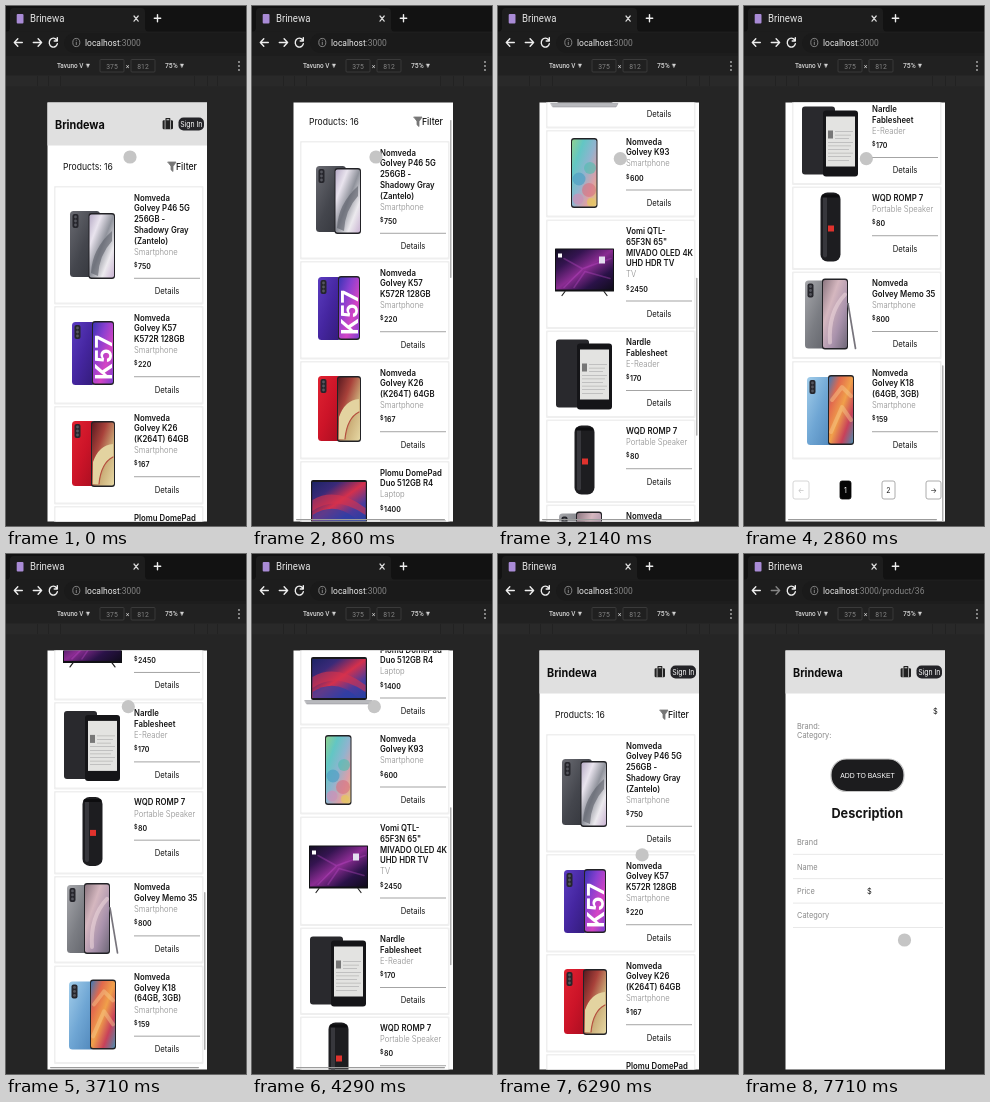
An HTML page for the animation above (8 s loop, 240x520 px).

```html
<!DOCTYPE html>
<html lang="en">
<head>
<meta charset="utf-8">
<title>Brinewa</title>
<style>
  html, body { margin: 0; width: 100%; height: 100%; overflow: hidden; background: #252525; }
  svg { display: block; width: 240px; height: 520px; }
  text { white-space: pre; }
</style>
</head>
<body>
<svg id="stage" viewBox="0 0 240 520" xmlns="http://www.w3.org/2000/svg"></svg>
<script>
const TALL = 1.08;
const UI = "Roboto, 'Open Sans', sans-serif";
const PAGE = "Inter, 'Open Sans', sans-serif";

const rect = (x, y, w, h, fill, r = 0, extra = '') =>
  `<rect x="${x}" y="${y}" width="${w}" height="${h}" rx="${r}" fill="${fill}" ${extra}/>`;
const path = (d, stroke, width = 1, fill = 'none') =>
  `<path d="${d}" stroke="${stroke}" stroke-width="${width}" fill="${fill}" stroke-linecap="round" stroke-linejoin="round"/>`;
const line = (x1, x2, y, color, width = 0.9) =>
  rect(x1, y - width / 2, x2 - x1, width, color);
const dot = (x, y, r, fill) => `<circle cx="${x}" cy="${y}" r="${r}" fill="${fill}"/>`;

// y is the middle of the capitals
function text(x, y, str, size, { fill = '#151515', weight = 400, font = PAGE, anchor = 'start' } = {}) {
  const base = y + 0.36 * size * TALL;
  return `<text transform="translate(${x} ${base}) scale(1 ${TALL})" font-family="${font}" font-size="${size}" font-weight="${weight}" fill="${fill}" text-anchor="${anchor}">${str}</text>`;
}

function gradient(id, ...colors) {
  const stops = colors.map((c, i) => `<stop offset="${i / (colors.length - 1)}" stop-color="${c}"/>`);
  return `<linearGradient id="${id}" x1="0" y1="0" x2="1" y2="1">${stops.join('')}</linearGradient>`;
}

const defs = `<defs>
  ${gradient('graphite', '#6a6b72', '#44464d', '#303238')}
  ${gradient('lilac', '#b7abc6', '#e9e4ee', '#8f929b', '#eceaee', '#c9b3d2')}
  ${gradient('violet', '#5b3cc0', '#4526a0', '#321b78')}
  ${gradient('indigo', '#3b34b4', '#8a3fd0', '#d545c4', '#7a3fd0')}
  ${gradient('red', '#e02231', '#cc1428', '#a80e20')}
  ${gradient('sand', '#5a1a20', '#a8413a', '#cdb27c', '#e6d8a4')}
  ${gradient('laptop', '#1d2466', '#3a2a78', '#d4304c', '#4a3a9c', '#2340a4')}
  ${gradient('aqua', '#8fd08f', '#62c6c4', '#8fb4cf', '#dba0a8', '#e6cc74')}
  ${gradient('night', '#141024', '#341450', '#8a2c92', '#2a1248', '#100c1c')}
  ${gradient('silver', '#a8a9ad', '#7b7d83', '#5c5e65')}
  ${gradient('rose', '#8b7680', '#d5b7bf', '#a992ac', '#6f6878')}
  ${gradient('sky', '#a2cdea', '#6fa6d4', '#4f86ba')}
  ${gradient('coral', '#3f79b5', '#e2694d', '#f0a04a', '#c8415a', '#4b8db0')}
  <clipPath id="view"><rect x="41.5" y="96.5" width="159.5" height="419"/></clipPath>
</defs>`;

const phone = (x, y, w, h, paint) =>
  rect(x, y, w, h, '#222226', 3) + rect(x + 1, y + 1.5, w - 2, h - 3, `url(#${paint})`, 2);
const back = (x, y, w, h, paint) =>
  rect(x, y, w, h, `url(#${paint})`, 3.5) + rect(x + 2.5, y + 3, 6, 14, '#25252b', 2)
  + [6, 10, 14].map(d => dot(x + 5.5, y + d, 1.4, '#55565e')).join('');

// pictures use the card top as y = 0
const pictures = [
  () => back(64, 24, 30, 66, 'graphite') + phone(82.5, 26, 26.5, 66, 'lilac')
    + path('M85 86Q86 62 106 44V54Q93 68 92 89Z', 'none', 0, '#5d606a99'),
  () => back(66, 15, 23, 63, 'violet') + phone(86, 14, 22, 64, 'indigo')
    + `<text transform="translate(105.8 73) rotate(-90)" font-family="${PAGE}" font-size="23.5" font-weight="700" fill="#fff">K57</text>`,
  () => back(66, 14, 23, 65, 'red') + phone(85, 14, 24, 66, 'sand')
    + path('M87 77V55Q93 38 107 37V50Q95 56 93 77Z', 'none', 0, '#e3d3a0')
    + path('M93 77Q95 56 107 50', '#b5503f', 1.2),
  () => rect(59, 18, 56, 43, '#19191d', 2) + rect(60.2, 20, 53.6, 39, 'url(#laptop)')
    + path('M60.5 38Q84 24 113.5 46V53Q84 32 60.5 49Z', 'none', 0, '#d8324e99')
    + path('M60.5 59V53Q84 38 106 59Z', 'none', 0, '#2740a8aa')
    + path('M53 61.5H120L118 65H55Z', '#8b8b90', 0.5, '#b8b9bd'),
  () => phone(73, 7, 26.5, 70, 'aqua')
    + dot(81, 48, 6.5, '#4c9fc5aa') + dot(91, 59, 7, '#d9707f99') + dot(80, 68, 5.5, '#cf8fb8aa')
    + dot(92, 37, 6, '#4fbfae99') + dot(93, 71, 4, '#e8c85caa'),
  () => rect(57, 28, 59, 43, '#101014', 0.5) + rect(58, 29, 57, 40, 'url(#night)')
    + path('M66 67L85 48L113 38M76 67L87 51L112 58M66 38L84 48', '#c64bd055', 1.5)
    + rect(60, 33, 4, 4, '#fff') + rect(101, 36, 6, 7, '#e4def0')
    + path('M67 71L64 75M106 71L109 75', '#222', 1.2),
  () => rect(58, 8, 33, 68, '#29292d', 3) + rect(79, 12, 35, 66, '#151518', 3)
    + rect(82, 18, 29, 50, '#e3e3e1') + rect(84, 32, 5, 8, '#777')
    + Array.from({ length: 9 }, (_, i) => line(i < 3 ? 91 : 84, 109 - i % 3 * 2, 33 + i * 3.6, '#aaa', 0.6)).join(''),
  () => rect(76.5, 5, 20, 69, '#1d1d20', 7) + rect(79, 8, 4, 62, '#37373c', 2)
    + rect(77.5, 7, 18, 3, '#0d0d0f', 1.5) + rect(84, 38, 6, 6, '#e0322d'),
  () => back(61, 8, 26, 68, 'silver') + phone(78, 6, 26, 71, 'rose')
    + path('M86 70Q84 40 101 22', '#f1d9dd88', 4) + path('M104 31L111.5 76', '#77747c', 1.7),
  () => back(63, 15, 25, 68, 'sky') + phone(84, 13, 26, 70, 'coral')
    + path('M87 70L98 45L107 58M88 38L98 25L107 34', '#f6c98c77', 4)
];

const products = [
  [181, 116, 'Nomveda|Golvey P46 5G|256GB -|Shadowy Gray|(Zantelo)', 'Smartphone', 750],
  [301, 96, 'Nomveda|Golvey K57|K572R 128GB', 'Smartphone', 220],
  [401, 96, 'Nomveda|Golvey K26|(K264T) 64GB', 'Smartphone', 167],
  [501, 85, 'Plomu DomePad|Duo 512GB R4', 'Laptop', 1400],
  [590, 85, 'Nomveda|Golvey K93', 'Smartphone', 600],
  [679.5, 107, 'Vomi QTL-|65F3N 65"|MIVADO OLED 4K|UHD HDR TV', 'TV', 2450],
  [790.5, 85, 'Nardle|Fablesheet', 'E-Reader', 170],
  [879.5, 81, 'WQD ROMP 7', 'Portable Speaker', 80],
  [964.5, 85, 'Nomveda|Golvey Memo 35', 'Smartphone', 800],
  [1054, 96, 'Nomveda|Golvey K18|(64GB, 3GB)', 'Smartphone', 159]
];

function card([top, height, title, kind, price], i) {
  const lines = title.split('|');
  const sub = top + 11 + lines.length * 10.75;
  return rect(48, top - 1, 149.5, height + 2.5, '#efefef', 1)
    + rect(49.5, top + 0.5, 146.5, height - 1, '#fff', 1)
    + `<g transform="translate(0 ${top})">${pictures[i]()}</g>`
    + lines.map((s, n) => text(128, top + 10.5 + 10.75 * n, s, 7.8, { weight: 600 })).join('')
    + text(128, sub, kind, 7.7, { fill: '#8c8c8c', weight: 300 })
    + text(128, sub + 13, '$', 5.4, { weight: 600 })
    + text(132, sub + 14.3, price, 7, { weight: 600 })
    + line(128, 194, sub + 26.5, '#9a9a9a')
    + text(161, sub + 39.5, 'Details', 7.7, { anchor: 'middle' });
}

function pageButton(x, w, label, dark, faded) {
  const ink = dark ? '#fff' : faded ? '#bbb' : '#222';
  return rect(x, 1173, w, 18, dark ? '#050505' : '#fff', 2, `stroke="${faded ? '#ccc' : dark ? '#050505' : '#999'}" stroke-width=".8"`)
    + text(x + w / 2, 1182, label, 7, { fill: ink, anchor: 'middle' });
}

const header = rect(41, 96, 161, 43.5, '#e0e0e0')
  + text(49, 118.5, 'Brindewa', 10.8, { weight: 700, fill: '#0c0c0c' })
  + path('M160 114.5V112.6H163.8V114.5', '#222', 1.1)
  + rect(156.6, 114.3, 10.4, 9, '#222', 1.2)
  + rect(158.7, 114.3, 0.7, 9, '#e0e0e0') + rect(164.2, 114.3, 0.7, 9, '#e0e0e0')
  + rect(172.5, 111.5, 25.5, 13, '#242428', 5)
  + text(185.3, 118, 'Sign In', 6.9, { fill: '#fff', anchor: 'middle' });

const list = header
  + text(57, 160.5, 'Products: 16', 8.6)
  + path('M162 156H170L167 160.5V165.5L165 163.8V160.5Z', '#777', 0.8, '#777')
  + text(170, 160.5, 'Filter', 8.7, { weight: 500 })
  + products.map(card).join('')
  + pageButton(49, 16, '←', false, true) + pageButton(96, 11, '1', true)
  + pageButton(138, 13, '2') + pageButton(182, 15, '→');

const grey = { fill: '#8a8a8a' };
const detail = header
  + text(189, 157, '$', 7.4)
  + text(53, 172.5, 'Brand:', 7.4, grey) + text(53, 181, 'Category:', 7.4, grey)
  + rect(87, 205, 73, 32.5, '#1c1c1e', 15.5, 'stroke="#c6c6c6" stroke-width="1.2"')
  + text(123.5, 221.5, 'ADD TO BASKET', 6.85, { fill: '#fff', font: "'Liberation Sans', Arial, sans-serif", anchor: 'middle' })
  + text(123.3, 259.5, 'Description', 12.7, { weight: 700, anchor: 'middle' })
  + ['Brand', 'Name', 'Price', 'Category'].map((s, i) =>
      text(53, 288.3 + i * 24.4, s, 7.4, grey) + line(49, 199, 300.3 + i * 24.4, '#e6e6e6')).join('')
  + text(123, 337, '$', 7.4);

const ui = (x, y, s, size, fill, anchor, weight) => text(x, y, s, size, { fill, font: UI, anchor, weight });
const sizeBox = (x, s) => rect(x, 53.5, 24, 12.5, '#202020', 1, 'stroke="#404040" stroke-width=".8"')
  + ui(x + 12, 60, s, 6.8, '#828282', 'middle');

const chrome = rect(0, 0, 240, 26, '#121212')
  + path('M0 26Q4 26 4 21V6Q4 2 8 2H135Q139 2 139 6V21Q139 26 143 26Z', 'none', 0, '#1d1d1d')
  + rect(0, 25.5, 240, 24.5, '#1d1d1d') + rect(58, 27, 190, 20, '#1a1a1a', 10)
  + rect(10.7, 8, 6.8, 9.5, '#a98bd6', 1)
  + ui(24, 12.6, 'Brinewa', 9.6, '#e4e4e4')
  + path('M128 10L132.2 15.2M132.2 10L128 15.2', '#dcdcdc', 1.2)
  + path('M148.3 12.2H154.7M151.5 8.6V15.8', '#eeeeee', 1.4)
  + path('M16.3 36.5H8.3M11.8 32.8L8.3 36.5L11.8 40.2', '#eeeeee', 1.4)
  + `<g id="next">${path('M27.3 36.5H35.6M32.1 32.8L35.6 36.5L32.1 40.2', '#eeeeee', 1.4)}</g>`
  + path('M50.6 33.9A4.1 4.5 0 1 0 51.3 37.8M51.3 31.6V35H48.2', '#eeeeee', 1.4)
  + `<ellipse cx="70.3" cy="36.5" rx="3.5" ry="4.1" fill="none" stroke="#8f8f8f" stroke-width=".9"/>`
  + path('M70.3 36.2V38.6M70.3 34.2V34.3', '#8f8f8f', 0.9)
  + ui(79, 37, 'localhost<tspan id="address" fill="#858585">:3000</tspan>', 8.5, '#e8e8e8')
  + rect(0, 50, 240, 19.5, '#212121') + rect(0, 69.5, 240, 11, '#292929')
  + [31, 42, 54, 188, 201, 211].map(x => rect(x, 70, 0.8, 10, '#212121')).join('')
  + ui(51, 59.8, 'Tavuno V', 6.4, '#d4d4d4', 'start', 500) + path('M80.4 58H83.6L82 61.4Z', '#d4d4d4', 0.4, '#d4d4d4')
  + sizeBox(94, '375') + ui(121.5, 60, '×', 7, '#d4d4d4', 'middle') + sizeBox(125, '812')
  + ui(159, 59.8, '75%', 6.8, '#d4d4d4', 'start', 500) + path('M174.4 58H177.6L176 61.4Z', '#d4d4d4', 0.4, '#d4d4d4')
  + [56, 60, 64].map(y => dot(233, y, 0.9, '#b4b4b4')).join('');

document.getElementById('stage').innerHTML = defs + rect(0, 0, 240, 520, '#252525') + chrome
  + `<g clip-path="url(#view)">${rect(41, 96, 161, 421, '#fff')}
    <g id="list">${list}</g><g id="detail">${detail}</g>
    <g id="bars">${rect(44, 513, 149, 1.2, '#9b9b9b', 0.6)}<rect id="thumb" x="198" y="97" width="1.5" height="158" rx=".7" fill="#b0b0b0"/></g>
  </g><circle id="touch" r="6.6" fill="#c2c2c2" fill-opacity=".95"/>`;

// [step, value] pairs, seven steps per second
const LOOP = 8000, RATE = 7, OPENED = 52;
const scrollKeys = [[0, 0], [3, 0], [6, 45], [10, 215], [15, 465], [20, 698], [25, 698], [30, 416], [37, 38.5], [38, 0]];
const xKeys = [[0, 124], [10, 124], [15, 122.3], [40, 122.3], [47, 160.5]];
const yKeys = [[0, 151], [10, 151], [15, 152.7], [40, 152.7], [46, 375], [48, 388.5], [49, 386]];

function at(keys, k) {
  const i = keys.findIndex(([step]) => step > k);
  if (i < 0) return keys[keys.length - 1][1];
  const [a, from] = keys[i - 1], [b, to] = keys[i];
  return from + (to - from) * (k - a) / (b - a);
}

const el = id => document.getElementById(id);
const show = (id, on) => el(id).setAttribute('visibility', on ? 'visible' : 'hidden');
const start = performance.now();

function draw() {
  const t = (performance.now() - start) % LOOP;
  const k = Math.min(55, Math.floor((t + 5) * RATE / 1000));
  const scroll = at(scrollKeys, k), opened = k >= OPENED;
  el('list').setAttribute('transform', `translate(0 ${-scroll})`);
  el('thumb').setAttribute('y', 97 + scroll * 420 / 1118);
  el('touch').setAttribute('cx', at(xKeys, k));
  el('touch').setAttribute('cy', at(yKeys, k));
  show('list', !opened);
  show('detail', opened);
  show('bars', k >= 4 && k < 43);
  el('next').setAttribute('opacity', opened ? 0.5 : 1);
  el('address').textContent = opened ? ':3000/product/36' : ':3000';
  requestAnimationFrame(draw);
}
draw();
</script>
</body>
</html>
```
